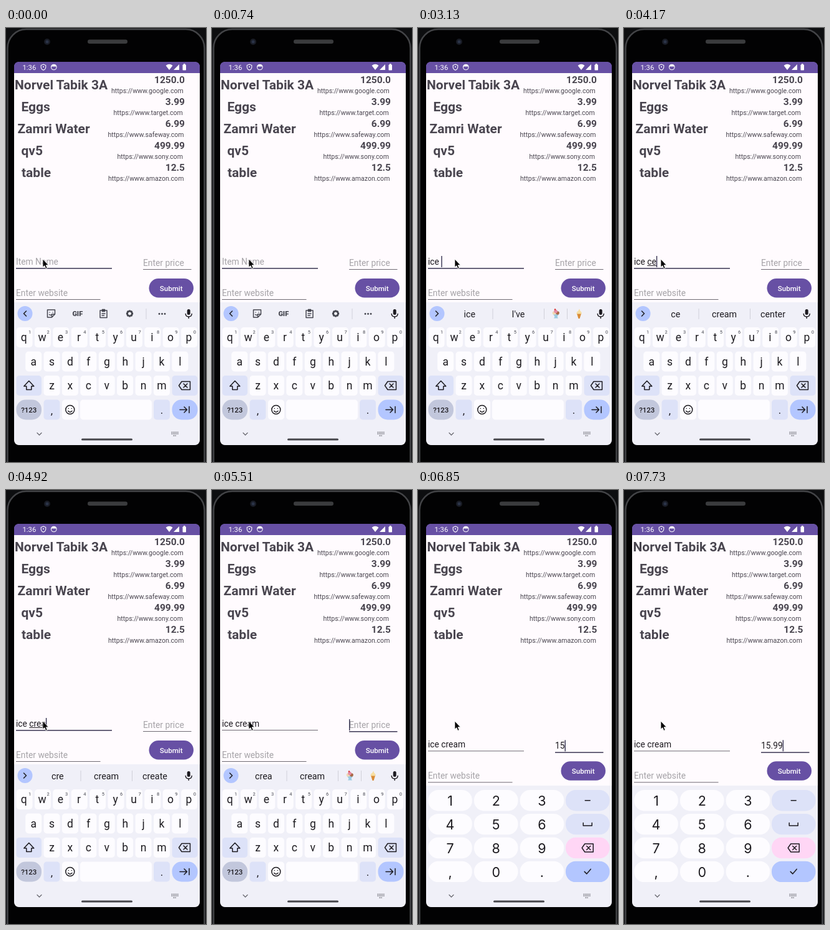
An HTML page that plays this animation: 321x693 px, repeating every 8000 ms.

```html
<!DOCTYPE html>
<html lang="en">
<head>
<meta charset="utf-8">
<title>Shopping list</title>
<style>
html, body { margin: 0; width: 100%; height: 100%; overflow: hidden; background: #000; }
svg { display: block; width: 321px; height: 693px; }
text { font-family: Roboto, "Liberation Sans", sans-serif; white-space: pre; }
.mid { text-anchor: middle; }
.digit { text-anchor: middle; font-family: Inter, Roboto, sans-serif; }
.line { fill: none; stroke: #45464f; stroke-width: 1.5; stroke-linecap: round; stroke-linejoin: round; }
</style>
</head>
<body>
<svg id="stage" viewBox="0 0 321 693" xmlns="http://www.w3.org/2000/svg"></svg>
<script>
const LOOP = 8000;
const INK = '#1d1b20', KEY = '#fdfcff', SOFT = '#dde2f8', BLUE = '#b3c6ff', PURPLE = '#6750a4';
const BOARD = '#f0f0f8', HINT = '#a5a3a7', RULE = '#6f6b74';
const stage = document.getElementById('stage');

const rect = (x, y, w, h, r, fill, more = '') =>
  `<rect x="${x}" y="${y}" width="${w}" height="${h}" rx="${r}" fill="${fill}" ${more}/>`;
const circle = (x, y, r, fill) => `<circle cx="${x}" cy="${y}" r="${r}" fill="${fill}"/>`;
const label = (s, x, y, size, fill = INK, more = '') =>
  `<text x="${x}" y="${y}" font-size="${size}" fill="${fill}" ${more}>${s}</text>`;
const centred = (s, x, y, size, fill = INK, more = '') => label(s, x, y, size, fill, `class="mid" ${more}`);
const icon = (x, y, d, more = '') => `<path class="line" transform="translate(${x} ${y})" d="${d}" ${more}/>`;
const group = (id, body) => `<g id="${id}">${body}</g>`;

const BACKSPACE = 'M-9 0L-4.5-6.5H9V6.5H-4.5ZM-1.5-3L4.5 3M4.5-3L-1.5 3';
const dark = `style="stroke:${INK}"`;

function phone() {
  return rect(0, 0, 321, 693, 0, '#0d0e10') +
    rect(2.5, 2, 316, 720, 30, '#020203', 'stroke="#434447" stroke-width="2.5"') +
    circle(66, 22, 5, '#191c25') + circle(66, 22, 2.5, '#2b3448') +
    rect(131, 18.5, 64, 6.5, 3.2, '#3a3b3d') +
    rect(13, 54, 298, 612, 9, '#fffbfe');
}

function statusBar() {
  const thin = 'stroke="#fff" stroke-width="1.1" fill="none"';
  return `<path d="M13 72V62q0-8 8-8H303q8 0 8 8V72Z" fill="${PURPLE}"/>` +
    label('1:36', 26.5, 67, 11.3, '#fff') +
    `<path d="M60 58L63.8 59.500V62.500Q63.500 66 60 67.300Q56.500 66 56.200 62.500V59.500Z" ${thin}/>` +
    circle(60, 62, 1, '#fff') +
    `<circle cx="76.8" cy="62.5" r="4.3" ${thin}/>` +
    '<path d="M72.5 61.5a4.4 4 0 0 1 8.6 0Z" fill="#fff"/>' +
    '<path d="M256.5 60Q262 55.5 267.5 60L262 67Z" fill="#fff"/>' +
    '<path d="M269 67H278V58Z" fill="#fff"/>' +
    rect(283.5, 58.5, 5.5, 9, 0.8, '#fff') + rect(285, 57, 2.5, 2, 0, '#fff');
}

function shoppingList() {
  const rows = [
    ['Norvel Tabik 3A', 14, '1250.0', 'google', 169],
    ['Eggs', 24.5, '3.99', 'target', 172.5],
    ['Zamri Water', 18.5, '6.99', 'safeway', 163.5],
    ['qv5', 24.5, '499.99', 'sony', 178.5],
    ['table', 25, '12.5', 'amazon', 164]
  ];
  return rows.map(([name, x, price, site, siteX], i) => {
    const y = 35 * i;
    return label(name, x, y + 98, 21, '#49454f', 'font-weight="700"') +
      label(price, 287, y + 88, 15.5, '#49454f', 'font-weight="700" text-anchor="end"') +
      label(`https://www.${site}.com`, siteX, y + 104, 10.55, '#49454f');
  }).join('');
}

function field(id, x, y, lineY, width) {
  return label('', x, y, 13.8, INK, `id="${id}Text"`) +
    rect(x, y + 1, 0, 1, 0, INK, `id="${id}Mark"`) +
    rect(x, lineY, width, 1, 0, RULE, `id="${id}Line"`) +
    rect(x, y - 14, 1.4, 18, 0, '#33304f', `id="${id}Caret"`);
}

function form() {
  return field('item', 16, 378, 383, 154) + field('price', 220, 380, 385, 77.5) +
    label('Enter website', 16, 427.5, 13.8, HINT) + rect(16, 433, 135.5, 1, 0, RULE) +
    rect(229.5, 400, 71.5, 30.5, 15.2, PURPLE) +
    centred('Submit', 265.2, 419.5, 11.6, '#fff', 'font-weight="500"');
}

function letterKeys() {
  const pitch = 29.4;
  const letters = (row, x, y, digits) => [...row].map((c, i) => {
    const cx = x + i * pitch;
    return rect(cx - 13, y - 16, 26, 32, 5, KEY) + centred(c, cx - (digits ? 0.8 : 0), y + 6, 17.5) +
      (digits ? centred((i + 1) % 10, cx + 8.7, y - 6.5, 7.5, '#45464f') : '');
  }).join('');
  const y = 609.5;
  return letters('qwertyuiop', 29.5, 494, true) + letters('asdfghjkl', 44.2, 532.5) + letters('zxcvbnm', 73.5, 571) +
    rect(16.5, 555, 40.5, 32, 5, SOFT) + icon(36.8, 571, 'M0-7.5L8 1H4V6.5H-4V1H-8Z', dark) +
    rect(266.5, 555, 41, 32, 5, SOFT) + icon(286.5, 571, BACKSPACE, dark) +
    rect(16.5, y - 16, 40.5, 32, 15, '#c2c7dc') + centred('?123', 36.8, y + 4, 11.5, INK, 'font-weight="500"') +
    rect(60.5, y - 16, 26, 32, 5, SOFT) + centred(',', 73.5, y + 7, 17) +
    rect(90, y - 16, 26, 32, 5, KEY) +
    icon(102.8, y, 'M-7 0a7 7 0 1 0 14 0a7 7 0 1 0-14 0M-3.2 2Q0 5.5 3.2 2M-2.5-2v.1M2.5-2v.1', dark) +
    rect(119, y - 16, 115, 32, 5, KEY) +
    rect(237, y - 16, 26, 32, 5, SOFT) + centred('.', 250, y + 6, 17) +
    rect(266.5, y - 16, 41, 32, 15, BLUE) + icon(286.5, y, 'M-7.5 0H4M-.5-4.5L4 0L-.5 4.5M7.5-5V5', dark);
}

function tools() {
  const gear = Array.from({ length: 8 }, (_, i) => {
    const a = i * Math.PI / 4, c = Math.cos(a), s = Math.sin(a);
    return `M${4.2 * c} ${4.2 * s}L${5.6 * c} ${5.6 * s}`;
  }).join('');
  return icon(30.5, 456, 'M2-4L-2 0L2 4', dark) +
    icon(72.5, 456, 'M-6-6H6V1L1 6H-6ZM1 6V1H6M-2.5-2v.1M2.5-2v.1M-3 1.5Q-1.5 3 0 2') +
    centred('GIF', 114.8, 460, 11, '#45464f', 'font-weight="900"') +
    icon(156.5, 456, 'M-5.5-5H5.5V6.5H-5.5ZM-2-6.5H2V-3.5H-2ZM-2.5 0H2.5M-2.5 3H1') +
    icon(198.5, 456, 'M-3.8 0a3.8 3.8 0 1 0 7.6 0a3.8 3.8 0 1 0-7.6 0', 'style="stroke-width:2.6"') +
    icon(198.5, 456, gear, 'style="stroke-width:2.8;stroke-linecap:butt"') +
    rect(224.5, 448, 1, 17, 0, '#d0d0d9') +
    [246, 250.5, 255].map(x => circle(x, 456.5, 1.4, '#45464f')).join('');
}

function suggestions() {
  const sundae = '<path d="M217 457H226L223.5 461L225 463.500H218L219.500 461Z" fill="#9ccbe2"/>' +
    circle(218.5, 455, 2.8, '#f0d9b5') + circle(224, 455, 2.8, '#a96845') + circle(221, 452.5, 2.8, '#e58ca5') +
    circle(220, 449.5, 1.3, '#d83434');
  const cone = '<path d="M255 456H262L259.500 464H257.500Z" fill="#d98b36"/>' +
    '<path d="M254.5 456.5Q254 453 257 452L259 448.5L260.5 452Q263.5 454 262.5 456.5Z" fill="#f7dfa4"/>';
  return icon(30.5, 456, 'M-2-4L2 0L-2 4', dark) +
    [82.8, 161, 239].map((x, i) => centred('', x, 462, 14.3, INK, `id="word${i}"`)).join('') +
    rect(119.5, 448, 1, 17, 0, '#d0d0d9') + rect(202, 448, 1, 17, 0, '#d0d0d9') +
    group('emoji', rect(239, 448, 1, 17, 0, '#d0d0d9') + sundae + cone);
}

function letterBoard() {
  return rect(13, 438, 298, 200, 0, BOARD) + circle(30.5, 456, 12, BLUE) +
    group('tools', tools()) + group('suggestions', suggestions()) +
    rect(290.7, 449, 5, 9, 2.5, INK) + icon(293.2, 456, 'M-5 .5Q-4.5 5 0 5Q4.5 5 5 .5M0 5V7.5', dark) +
    letterKeys();
}

function numberBoard() {
  const rows = ['123', '456', '789', ',0.'];
  const sides = [[SOFT, 'M-4 0H4'], [SOFT, 'M-7-2V2.5H7V-2'], ['#ffd6f5', BACKSPACE], [BLUE, 'M-5 0L-1.5 3.5L5-4']];
  return rect(13, 472, 298, 166, 0, BOARD) + rows.map((row, r) => {
    const y = 495.7 + 37.9 * r, [fill, d] = sides[r];
    return [...row].map((c, i) => rect(16.3 + 73.7 * i, y - 16.7, 70.5, 33.4, 16, KEY) +
      label(c, 51.5 + 73.7 * i, y + 8.5, 21.5, INK, 'class="digit"')).join('') +
      rect(237, y - 16.7, 70.5, 33.4, 16, fill) + icon(272.2, y, d, dark);
  }).join('');
}

function navBar() {
  const keys = [-2.5, 0].map(y => `M-5.5 ${y}H5.5`).join('') + 'M-2.5 3H2.5';
  return `<path d="M13 636H311V657q0 9-9 9H22q-9 0-9-9Z" fill="${BOARD}"/>` +
    icon(53.5, 648, 'M-3.5-1.5L0 2L3.5-1.5', 'style="stroke:#66666e;stroke-width:1.2"') +
    rect(121, 655.5, 82, 3, 1.5, '#45454b') +
    icon(271, 648, keys, 'style="stroke:#66666e;stroke-dasharray:1.4 1;stroke-linecap:butt"');
}

const pointer = '<path d="M59 369V382L61.900 379.500L64 384.300L66.200 383.300L64.100 378.700H68.200Z" fill="#000" stroke="#fff" stroke-width=".8"/>';

stage.innerHTML = phone() + statusBar() + group('list', shoppingList()) + group('form', form()) +
  group('letters', letterBoard()) + group('numbers', numberBoard()) + navBar() + pointer;
const $ = id => document.getElementById(id);

// Text fields: time, text, start and end of the composing word, caret shown
const itemSteps = [
  [0, '', 0, 0, false], [440, '', 0, 0, true], [740, '', 0, 0, false],
  [2390, 'ic', 0, 2, true], [2680, 'ice', 0, 3, true], [2980, 'ice ', 0, 0, true],
  [3570, 'ice c', 4, 5, true], [3870, 'ice ce', 4, 5, true], [4170, 'ice ce', 4, 6, true],
  [4470, 'ice c', 4, 5, true], [4620, 'ice cr', 4, 6, true], [4770, 'ice cre', 4, 7, true],
  [4920, 'ice crea', 4, 8, true], [5210, 'ice cream', 4, 9, true], [5510, 'ice cream', 0, 0, false]
];
const priceSteps = [
  [0, '', 0, 0, false], [5510, '', 0, 0, true], [5950, '', 0, 0, false], [6400, '1', 0, 0, true],
  [6850, '15', 0, 0, true], [7290, '15.', 0, 0, true], [7590, '15.9', 0, 0, true], [7730, '15.99', 0, 0, true]
];
// An empty third word shows the emoji pair
const wordSteps = [
  [0, '', '', ''], [2390, 'ic', 'ice', ''], [2830, 'ice', "I've", ''], [3870, "can't", "I've", ''],
  [4170, 'ce', 'cream', 'center'], [4470, 'c', 'can', 'come'], [4770, 'cre', 'cream', 'create'],
  [5060, 'crea', 'cream', '']
];
const at = (steps, t) => steps.filter(s => s[0] <= t).pop();
const show = (id, on) => $(id).setAttribute('display', on ? 'inline' : 'none');

function setField(id, hint, [, text, from, to, caret], focused) {
  const el = $(id + 'Text'), x = +el.getAttribute('x');
  el.textContent = text || hint;
  el.setAttribute('fill', text ? INK : HINT);
  const width = n => n ? el.getSubStringLength(0, n) : 0;
  const mark = $(id + 'Mark');
  mark.setAttribute('x', x + width(from));
  mark.setAttribute('width', width(to) - width(from));
  $(id + 'Caret').setAttribute('x', x + width(text.length));
  show(id + 'Caret', caret);
  const line = $(id + 'Line');
  line.setAttribute('height', focused ? 1.6 : 1);
  line.setAttribute('fill', focused ? '#45415c' : RULE);
}

function render(t) {
  const onPrice = t >= 5510, numeric = t >= 5660;
  setField('item', 'Item Name', at(itemSteps, t), !onPrice);
  setField('price', 'Enter price', at(priceSteps, t), onPrice);
  const words = at(wordSteps, t).slice(1);
  words.forEach((w, i) => { $('word' + i).textContent = w; });
  show('emoji', !words[2]);
  show('tools', !words[0]);
  show('suggestions', words[0]);
  show('letters', !numeric);
  show('numbers', numeric);
  $('form').setAttribute('transform', `translate(0 ${numeric ? 33.3 : 0})`);
  $('list').setAttribute('transform', `translate(${numeric ? 0.5 : 0} 0)`);
}

const start = performance.now();
function tick() {
  render((performance.now() - start) % LOOP);
  requestAnimationFrame(tick);
}
tick();
</script>
</body>
</html>
```
